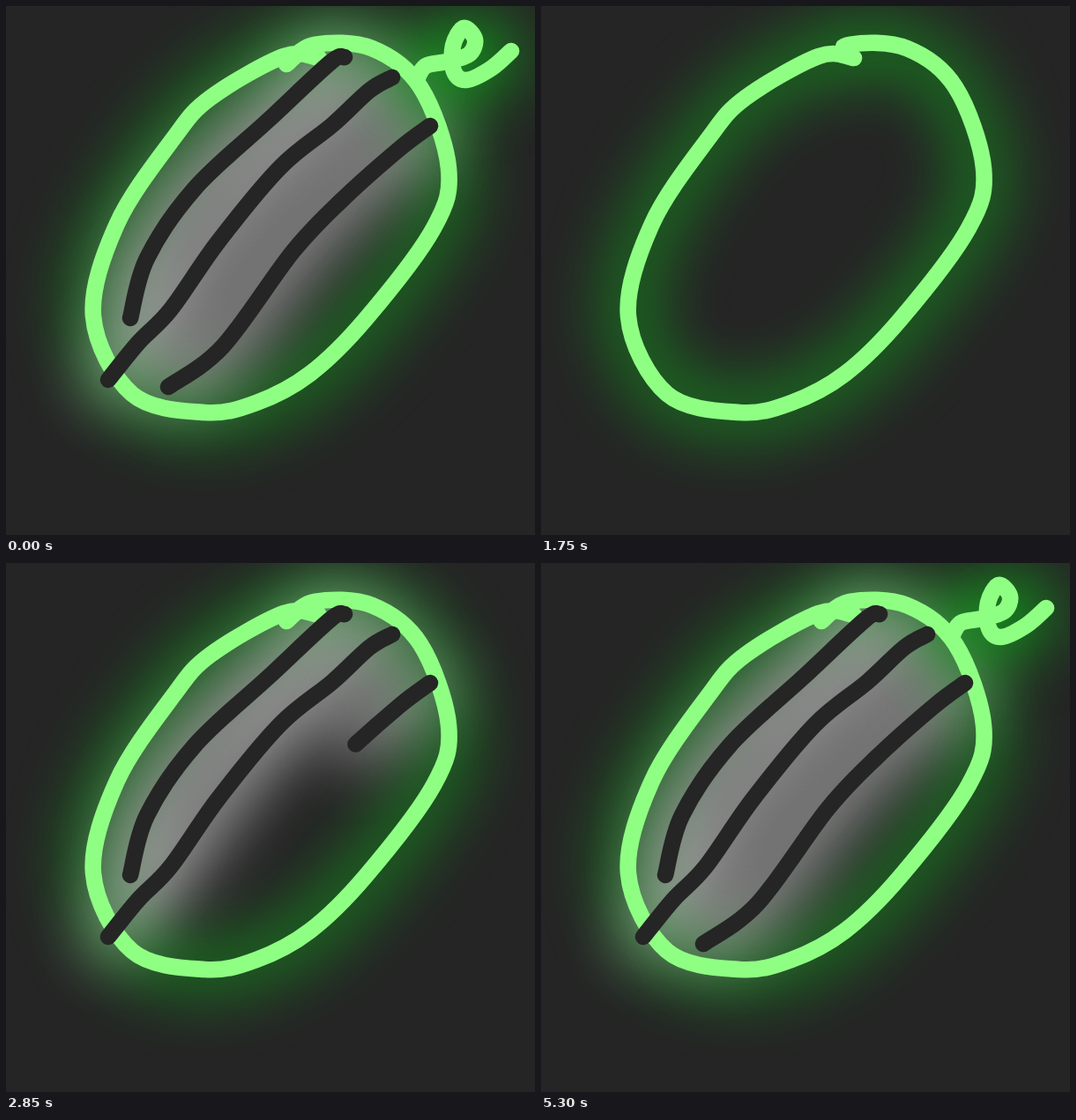
Write an HTML page that moves like this. It is 600 px wide and 600 px high and loops after 5.35 s.

```html
<!DOCTYPE html>
<html lang="en">
<head>
<meta charset="utf-8">
<title>Melon sketch</title>
<style>
  html, body { margin: 0; height: 100%; overflow: hidden; background: #252525; }
  svg { display: block; }
  path { fill: none; stroke-linecap: round; stroke-linejoin: round; }
  #lines path { stroke-width: 18.6px; }
  #glows path { stroke-width: 30px; filter: blur(38px); }
  .rind { stroke: #8fff84; }
  .stripe { stroke: #252525; }
  #glows .rind { stroke: rgb(14, 185, 26); }
  #glows .stripe { stroke: #fff; }
</style>
</head>
<body>
<svg width="600" height="600" viewBox="0 0 600 600">
  <g id="glows"></g>
  <g id="lines"></g>
</svg>
<script>
const LOOP = 5350, STEP = 50;

// Smooth curve through a few points
function curve(text) {
  const pts = text.split(' ').map(p => p.split(',').map(Number));
  const at = i => pts[Math.max(0, Math.min(pts.length - 1, i))];
  // Point i moved along its tangent, forwards or backwards
  const handle = (i, way) => at(i).map((v, k) => v + way * (at(i + 1)[k] - at(i - 1)[k]) / 6);
  return 'M' + pts[0] + pts.slice(1).map((p, i) => `C${handle(i, 1)} ${handle(i + 1, -1)} ${p}`).join('');
}

function addPath(group, kind, d) {
  const path = document.createElementNS('http://www.w3.org/2000/svg', 'path');
  path.setAttribute('class', kind);
  path.setAttribute('d', d);
  path.setAttribute('pathLength', 1);
  document.getElementById(group).append(path);
  return path;
}

function stroke(kind, start, end, points) {
  const d = curve(points);
  return { start, end, paths: ['glows', 'lines'].map(group => addPath(group, kind, d)) };
}

const strokes = [
  stroke('rind', 400, 1890, '355,59 315,57 232,104 190,150 126,247 99,352 143,440 225,461 284,450 ' +
    '345,417 408,355 485,252 502,184 470,92 415,48 350,44 318,66'),
  stroke('stripe', 1900, 2300, '384,58 368,64 298,129 214,207 160,286 141,354'),
  stroke('stripe', 2300, 2680, '438,81 412,96 370,135 311,183 241,267 187,344 150,382 116,424'),
  stroke('stripe', 2700, 3150, '481,136 445,163 380,221 325,279 246,386 184,432'),
  stroke('rind', 3550, 4500, '466,83 476,68 500,63 525,55 532,38 519,25 507,45 508,74 522,84 550,71 573,51'),
];

const ease = x => x * x * (3 - 2 * x);

function draw(t) {
  for (const { start, end, paths } of strokes) {
    const done = ease(Math.max(0, Math.min(1, (t - start) / (end - start))));
    for (const { style } of paths) {
      style.display = t < start ? 'none' : '';
      style.strokeDasharray = done < 1 ? `${Math.max(done, 0.001)} 2` : 'none';
    }
  }
}

let shown = -1;
function tick() {
  const t = Math.floor(performance.now() % LOOP / STEP) * STEP;
  // The finished drawing stays for the first step of the loop
  if (t !== shown) draw(t || LOOP);
  shown = t;
  requestAnimationFrame(tick);
}
tick();
</script>
</body>
</html>
```
